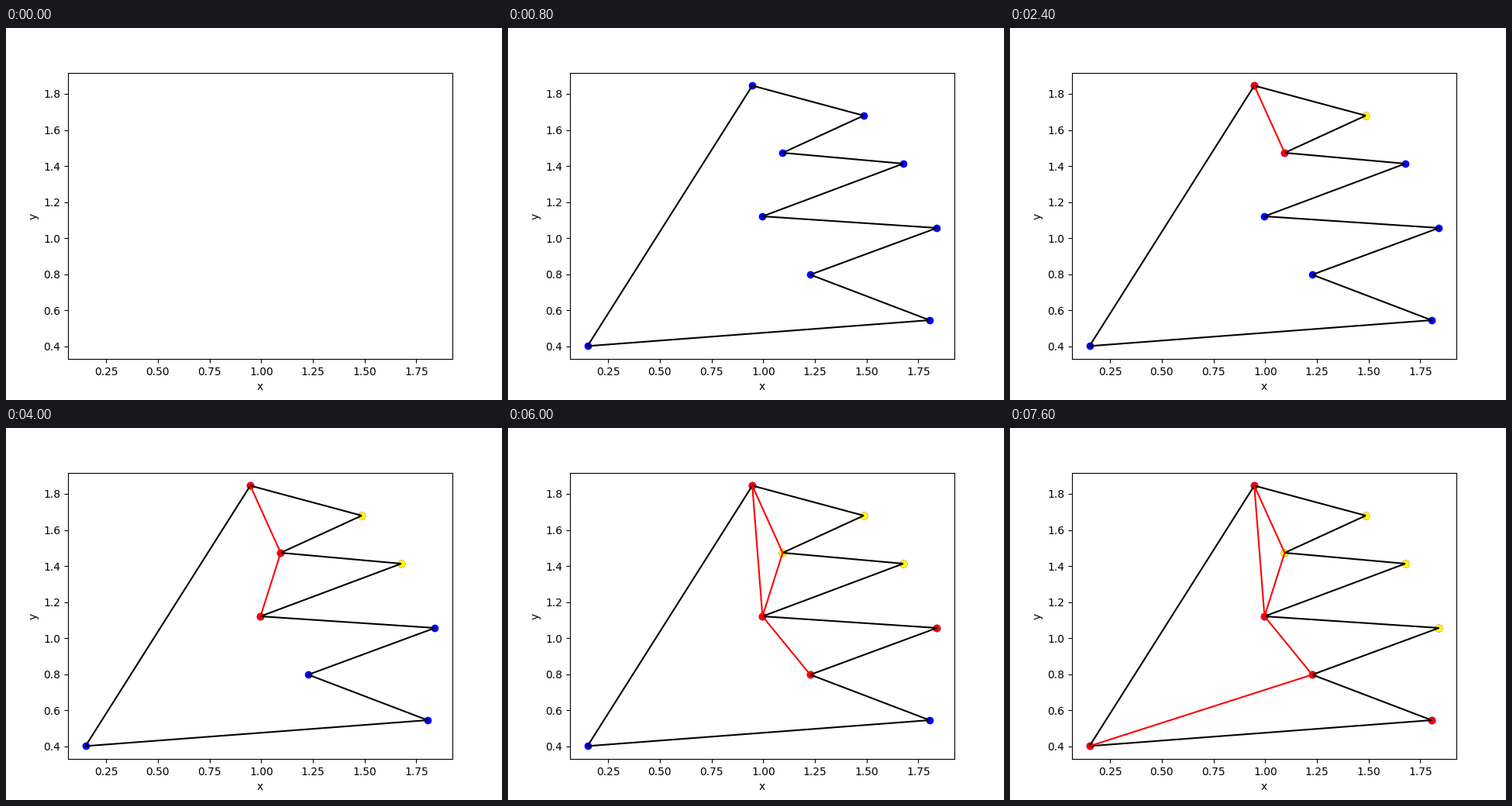
Write a matplotlib script that moves like this. It is 640x480 px and loops after 8 s.

```python
import matplotlib.pyplot as plt
from matplotlib.animation import FuncAnimation
from matplotlib.collections import LineCollection

STEP_MS = 400

# Polygon vertices in order along the outline.
VERTICES = {
    "A": (0.9471, 1.8453),
    "B": (1.4860, 1.6794),
    "C": (1.0940, 1.4733),
    "D": (1.6772, 1.4132),
    "E": (0.9965, 1.1213),
    "F": (1.8400, 1.0569),
    "G": (1.2274, 0.7980),
    "H": (1.8046, 0.5460),
    "I": (0.1502, 0.4025),
}

# Each step marks vertices ("red"/"yellow") or adds a diagonal ("line").
STEPS = [
    ("red", "AB"),
    ("red", "C"),
    ("line", "AC"),
    ("yellow", "B"),
    ("red", "D"),
    ("red", "E"),
    ("line", "CE"),
    ("yellow", "D"),
    ("line", "AE"),
    ("yellow", "C"),
    ("red", "F"),
    ("red", "G"),
    ("line", "EG"),
    ("yellow", "F"),
    ("red", "H"),
    ("red", "I"),
    ("line", "GI"),
]

fig, ax = plt.subplots(figsize=(6.4, 4.8), dpi=100)
ax.set(xlim=(0.0655, 1.9245), ylim=(0.3304, 1.9174), xlabel="x", ylabel="y")


def add_dots(names, color):
    return ax.scatter(*zip(*(VERTICES[n] for n in names)), color=color)


def add_segments(pairs, color):
    segments = [[VERTICES[n] for n in pair] for pair in pairs]
    lines = LineCollection(segments, colors=color, linewidths=1.5)
    ax.add_collection(lines, autolim=False)
    return lines


names = "".join(VERTICES)
artists = [
    add_dots(names, "blue"),
    add_segments(zip(names, names[1:] + names[0]), "black"),
]
for kind, target in STEPS:
    if kind == "line":
        artists.append(add_segments([target], "red"))
    else:
        artists.append(add_dots(target, kind))


def update(frame):
    for index, artist in enumerate(artists):
        artist.set_visible(index < frame)
    return artists


anim = FuncAnimation(
    fig,
    update,
    frames=len(artists) + 1,
    init_func=lambda: update(0),
    interval=STEP_MS,
    repeat=True,
    repeat_delay=0,
)
plt.show()
```
